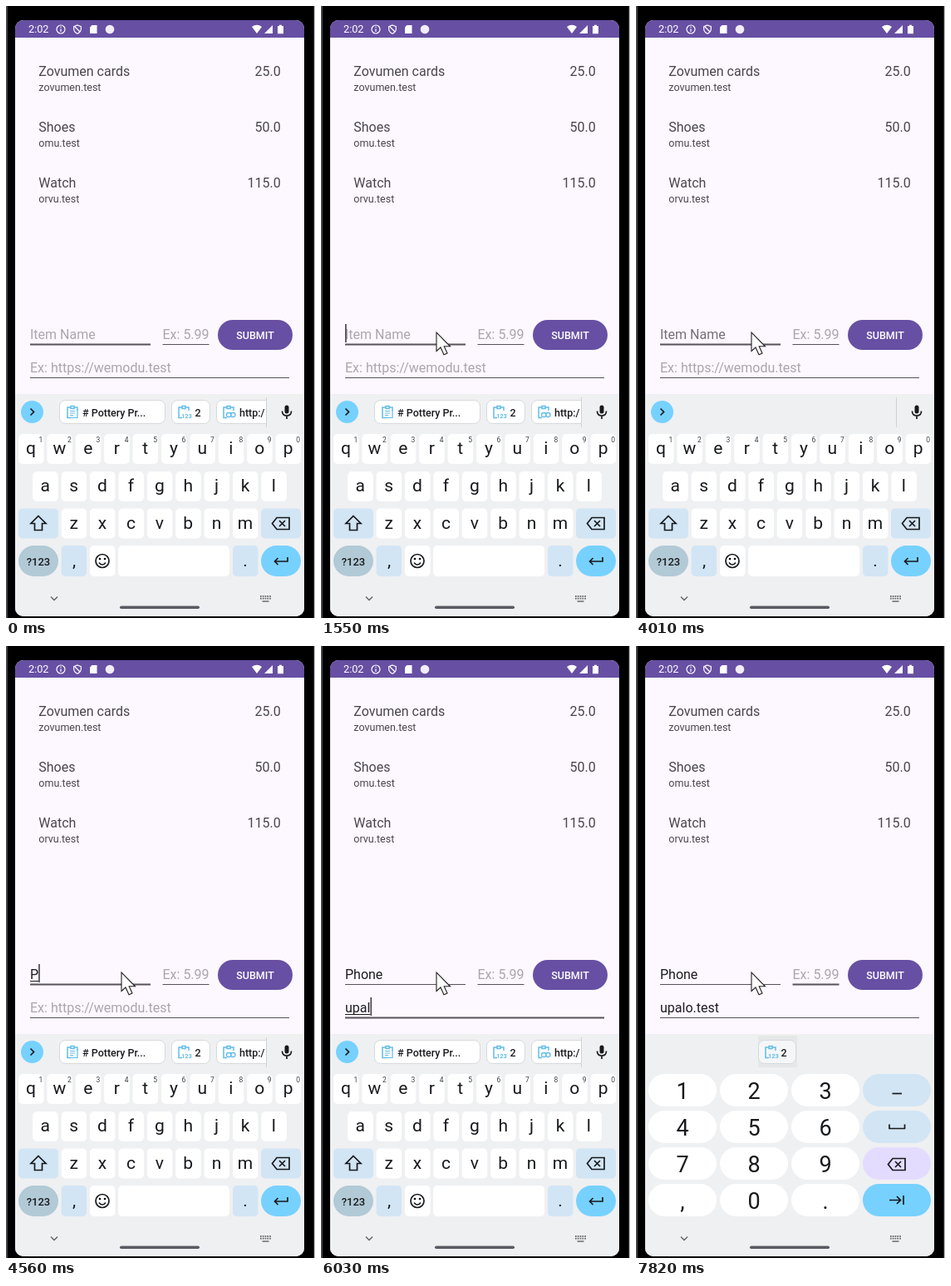
An HTML page that plays this animation: 372 px wide and 735 px high, repeating every 8 s.

```html
<!DOCTYPE html>
<html lang="en">
<head>
<meta charset="utf-8">
<title>Wish list entry</title>
<style>
html, body { margin: 0; width: 100%; height: 100%; overflow: hidden; background: #000; }
svg { display: block; width: 372px; height: 735px; }
text { font-family: Roboto, sans-serif; font-size: 16px; fill: #49454f; white-space: pre; }
.sub { font-size: 12.5px; }
.end { text-anchor: end; }
.mid { text-anchor: middle; }
.hint { fill: #aaa6ad; }
.typed { fill: #1d1b20; }
.chip { font-size: 12.5px; font-weight: 500; fill: #1b1b1f; }
.key { font-size: 21px; fill: #17191c; }
.num { font-size: 27px; fill: #17191c; }
.sup { font-size: 8.5px; fill: #3c4043; }
.line { fill: none; stroke: #17191c; stroke-width: 1.7; }
.blue { fill: none; stroke: #62bce8; stroke-width: 1.5; }
</style>
</head>
<body>
<svg viewBox="0 0 372 735">
  <rect width="372" height="735"/>
  <path d="M1 0V735" stroke="#55555a" stroke-width="1.6"/>
  <path d="M371.4 0V735" stroke="#b9b9bd" stroke-width="1.2"/>
  <clipPath id="screen"><rect x="11" y="17" width="348" height="716" rx="10"/></clipPath>
  <clipPath id="strip"><rect x="50" y="468" width="263" height="38"/></clipPath>
  <g clip-path="url(#screen)">
    <rect x="11" y="17" width="348" height="716" fill="#fdf7ff"/>
    <rect x="11" y="17" width="348" height="21" fill="#674fa3"/>
    <rect x="11" y="466" width="348" height="267" fill="#eff0f2"/>
  </g>

  <g id="status" fill="none" stroke="#fff" stroke-width="1.2">
    <text x="27" y="32.3" style="font-size:12.7px;fill:#fff" stroke="none">2:02</text>
    <circle cx="66" cy="28" r="5"/>
    <path d="M66 27.3V31M66 24.8V26"/>
    <path d="M86 23L90.3 24.7V28Q90 31.5 86 33.2Q82 31.5 81.700 28V24.7ZM83 25L89 31"/>
    <path d="M103.500 23H109.500V33H101V25.500Z" fill="#fff" stroke="none"/>
    <circle cx="125" cy="28" r="5.300" fill="#f3edf9" stroke="none"/>
    <path d="M296 25Q302 20.500 308 25L302 33ZM311 33L321 23V33ZM327 24H329V22.700H332V24H334V33.300H327Z" fill="#fff" stroke="none"/>
  </g>

  <g id="list"></g>

  <g id="form">
    <rect x="255" y="377" width="90" height="36" rx="18" fill="#674fa3"/>
    <text class="mid" x="300" y="399.800" style="font-size:12.5px;font-weight:500;fill:#fff">SUBMIT</text>
    <text id="nameHint" class="hint" x="29" y="399.700">Item Name</text>
    <text class="hint" x="188.500" y="399.700">Ex: 5.99</text>
    <text id="linkHint" class="hint" x="29" y="439.700">Ex: https://wemodu.test</text>
    <text id="name" class="typed" x="29" y="399.700"></text>
    <text id="link" class="typed" x="29" y="439.700"></text>
    <g stroke="#57515c">
      <path id="nameBar" d="M29 406.500H174"/>
      <path id="priceBar" d="M188.500 406.500H244.500"/>
      <path id="linkBar" d="M29 446.500H341"/>
    </g>
    <path id="compose" stroke="#1d1b20" stroke-width="1"/>
    <rect id="caret" width="1.700" height="22" fill="#4c4652"/>
  </g>

  <g id="letters"></g>
  <g id="digits"></g>

  <g fill="none" stroke="#5f6368" stroke-width="1.400">
    <path d="M54 709.500L58 713.500L62 709.500"/>
    <path d="M306 708.800H319M306 711.600H319" stroke-width="1.800" stroke-dasharray="1.700 1.100"/>
    <path d="M308.500 715H316.500"/>
    <path d="M138.700 722.300H231.300" stroke="#5b5b62" stroke-width="3.400" stroke-linecap="round"/>
  </g>
  <path id="pointer" d="M0 0V22.500L5 18L9 26.800L13 25L9.200 16.800H16.500Z" fill="#fff" stroke="#222" stroke-width="1.100"/>
</svg>
<script>
const LOOP = 8000;
const $ = id => document.getElementById(id);
const set = (el, attrs) => { for (const k in attrs) el.setAttribute(k, attrs[k]); };
const show = (el, on) => el.setAttribute('visibility', on ? 'visible' : 'hidden');
const clamp = v => Math.min(1, Math.max(0, v));

const text = (x, y, s, cls) => `<text x="${x}" y="${y}" class="${cls}">${s}</text>`;
const box = (x, y, w, h, r, fill, extra = '') =>
  `<rect x="${x}" y="${y}" width="${w}" height="${h}" rx="${r}" fill="${fill}" ${extra}/>`;
const path = (d, cls = 'line', extra = '') => `<path d="${d}" class="${cls}" ${extra}/>`;

const WHITE = '#fff', PALE = '#d2e5f4', SKY = '#76d1ff', EDGE = 'stroke="#d6d9dc"';

// Icons
const clipboard = (x, inner) =>
  path(`M${x + 4} 482H${x}V494.500H${x + 4}M${x + 8} 482H${x + 12}V486M${x + 4} 480.500H${x + 8}V483.500H${x + 4}Z`, 'blue') + inner;
const noteIcon = x => clipboard(x,
  path(`M${x + 4} 494.500H${x + 12}V485M${x + 3} 486.500H${x + 9}M${x + 3} 489H${x + 9}M${x + 3} 491.500H${x + 7}`, 'blue', 'style="stroke-width:1.2"'));
const numberIcon = x => clipboard(x,
  `<text x="${x + 3}" y="494.500" style="font-size:7.500px;font-weight:700;fill:#62bce8">123</text>`);
const linkIcon = x => clipboard(x,
  box(x + 3.500, 488.500, 5.500, 5, 2.500, 'none', 'stroke="#62bce8" stroke-width="1.300"') +
  box(x + 8.500, 488.500, 5.500, 5, 2.500, 'none', 'stroke="#62bce8" stroke-width="1.300"'));
const eraseIcon = (x, y) =>
  path(`M${x - 10.500} ${y}L${x - 5} ${y - 7}H${x + 10}V${y + 7}H${x - 5}ZM${x - 2} ${y - 3.500}L${x + 5} ${y + 3.500}M${x + 5} ${y - 3.500}L${x - 2} ${y + 3.500}`);

function buildList() {
  const items = [
    ['Zovumen cards', 'zovumen.test', '25.0'],
    ['Shoes', 'omu.test', '50.0'],
    ['Watch', 'orvu.test', '115.0']
  ];
  $('list').innerHTML = items.map(([title, site, price], i) => {
    const y = 84 + 67 * i;
    return text(39.300, y, title, '') + text(39.300, y + 18, site, 'sub') + text(330.700, y, price, 'end');
  }).join('');
}

function buildLetters() {
  const pitch = 34.4;
  let s = `<circle cx="31.500" cy="487.500" r="13.500" fill="${SKY}"/>` + path('M29.500 483.500L33.500 487.500L29.500 491.500');
  s += '<g id="chips" clip-path="url(#strip)">' +
    box(64.500, 473.500, 127, 28, 7, WHITE, EDGE) + noteIcon(74) + text(92, 492.700, '# Pottery Pr...', 'chip') +
    box(199.500, 473.500, 46, 28, 7, WHITE, EDGE) + numberIcon(208) + text(227.500, 492.700, '2', 'chip') +
    box(253.500, 473.500, 90, 28, 7, WHITE, EDGE) + linkIcon(262) + text(281, 492.700, 'http:/', 'chip') + '</g>';
  s += path('M313.500 470V506', '', 'stroke="#d0d2d5"');
  s += box(335.500, 479.500, 5, 10, 2.500, '#17191c') + path('M332.500 486.500Q332.500 492 338 492Q343.500 492 343.500 486.500M338 492V496');

  [['qwertyuiop', 15, 514], ['asdfghjkl', 32.2, 559], ['zxcvbnm', 66.6, 603.5]].forEach(([keys, x0, y], row) => {
    [...keys].forEach((c, i) => {
      const x = x0 + pitch * i;
      s += box(x, y, 30.500, 36, 5, WHITE) + text(x + 15, y + 24.300, c, 'key mid letter');
      if (!row) s += text(x + 27, y + 10, (i + 1) % 10, 'sup mid');
    });
  });

  s += box(15, 603.500, 48, 36, 5, PALE) + '<path id="shift" class="line" d="M39 612.500L48 621.500H43.500V629.500H34.500V621.500H30Z"/>';
  s += box(307, 603.500, 48, 36, 5, PALE) + eraseIcon(331, 621.500);
  s += box(15, 648, 48, 37, 18.500, '#b2c9d6') +
    `<text x="39" y="671.500" class="mid" style="font-size:13px;font-weight:500;fill:#17191c">?123</text>`;
  s += box(66.600, 648, 30.500, 37, 5, PALE) + text(82, 673, ',', 'key mid');
  s += box(101, 648, 30.500, 37, 5, WHITE) + '<circle cx="116" cy="666.500" r="8" class="line"/>' +
    path('M112 668.500Q116 673.500 120 668.500') +
    '<circle cx="113" cy="664" r="1.300"/><circle cx="119" cy="664" r="1.300"/>';
  s += box(135, 648, 134, 37, 5, WHITE) + box(273, 648, 30.500, 37, 5, PALE) + text(288, 673, '.', 'key mid');
  s += box(307, 648, 48, 37, 18.500, SKY) + path('M339 662V667H323.500M327.500 663L323.500 667L327.500 671');
  $('letters').innerHTML = s;
}

function buildDigits() {
  let s = box(147, 468, 47, 38, 0, '#e6e7e9') + box(147.500, 473.500, 45, 28, 7, '#f5f6f7', EDGE) +
    numberIcon(156) + text(174.500, 492.700, '2', 'chip');
  const side = [PALE, PALE, '#e4dcff', SKY];
  ['123', '456', '789', ',0.'].forEach((keys, row) => {
    const y = 514 + 44 * row;
    [...keys].forEach((c, i) => {
      s += box(15 + 86 * i, y, 82, 39, 19.500, WHITE) + text(56 + 86 * i, y + 30, c, 'num mid');
    });
    s += box(273, y, 82, 39, 19.500, side[row]);
  });
  s += path('M308.500 537.500H320') + path('M305 574.500V579.500H323.500V574.500') + eraseIcon(314, 622.500) +
    path('M305 665.500H318.500M314 661L318.500 665.500L314 670M322 660V671');
  $('digits').innerHTML = s;
}

buildList();
buildLetters();
buildDigits();
const letters = [...document.querySelectorAll('.letter')].map(el => [el, el.textContent]);

// Keystrokes as [time, characters typed so far]
const nameKeys = [[4560, 1], [4760, 2], [4830, 3], [5030, 4], [5100, 5]];
const linkKeys = [[5700, 1], [5900, 3], [6030, 4], [6160, 5], [6230, 6], [6430, 7], [6560, 8], [6760, 10]];
const caretOn = [[550, 1010], [1550, 2010], [2540, 3000], [3540, 3940], [4150, 7350], [7350, 7820]];
const typed = (s, keys, t) => s.slice(0, keys.reduce((n, [at, k]) => t >= at ? k : n, 0));

function render(t) {
  const field = t < 5300 ? 'name' : t < 7350 ? 'link' : 'price';
  const name = typed('Phone', nameKeys, t), link = typed('upalo.test', linkKeys, t);
  $('name').textContent = name;
  $('link').textContent = link;
  show($('nameHint'), !name);
  show($('linkHint'), !link);
  $('nameHint').style.fill = t >= 3940 && t < 4150 ? '#757078' : '';
  for (const f of ['name', 'link', 'price']) set($(f + 'Bar'), { 'stroke-width': f === field ? 1.9 : 1 });

  const y = field === 'link' ? 422 : 382;
  const width = field === 'price' ? 0 : $(field)[field === 'name' ? 'textContent' : 'textContent'] ? $(field).getComputedTextLength() : 0;
  set($('caret'), { x: (field === 'price' ? 188.5 : 29) + width, y });
  show($('caret'), caretOn.some(([a, b]) => t >= a && t < b));
  set($('compose'), { d: `M29 ${y + 20.5}h${width}` });
  show($('compose'), width > 0 && t < 6430);

  const caps = t >= 4490 && t < 4560;
  for (const [el, c] of letters) el.textContent = caps ? c.toUpperCase() : c;
  $('shift').style.fill = caps ? '#17191c' : '';
  set($('chips'), { opacity: t < 3940 ? 1 : clamp((t - 4040) / 250) });
  show($('letters'), t < 7350);
  show($('digits'), t >= 7350);

  const left = (1 - clamp((t - 70) / 800)) ** 2;
  set($('pointer'), { transform: `translate(${139 + 168 * left} ${392 + 274 * left})` });
  show($('pointer'), t >= 70);
}

const start = performance.now();
function tick() {
  render((performance.now() - start) % LOOP);
  requestAnimationFrame(tick);
}
tick();
</script>
</body>
</html>
```
